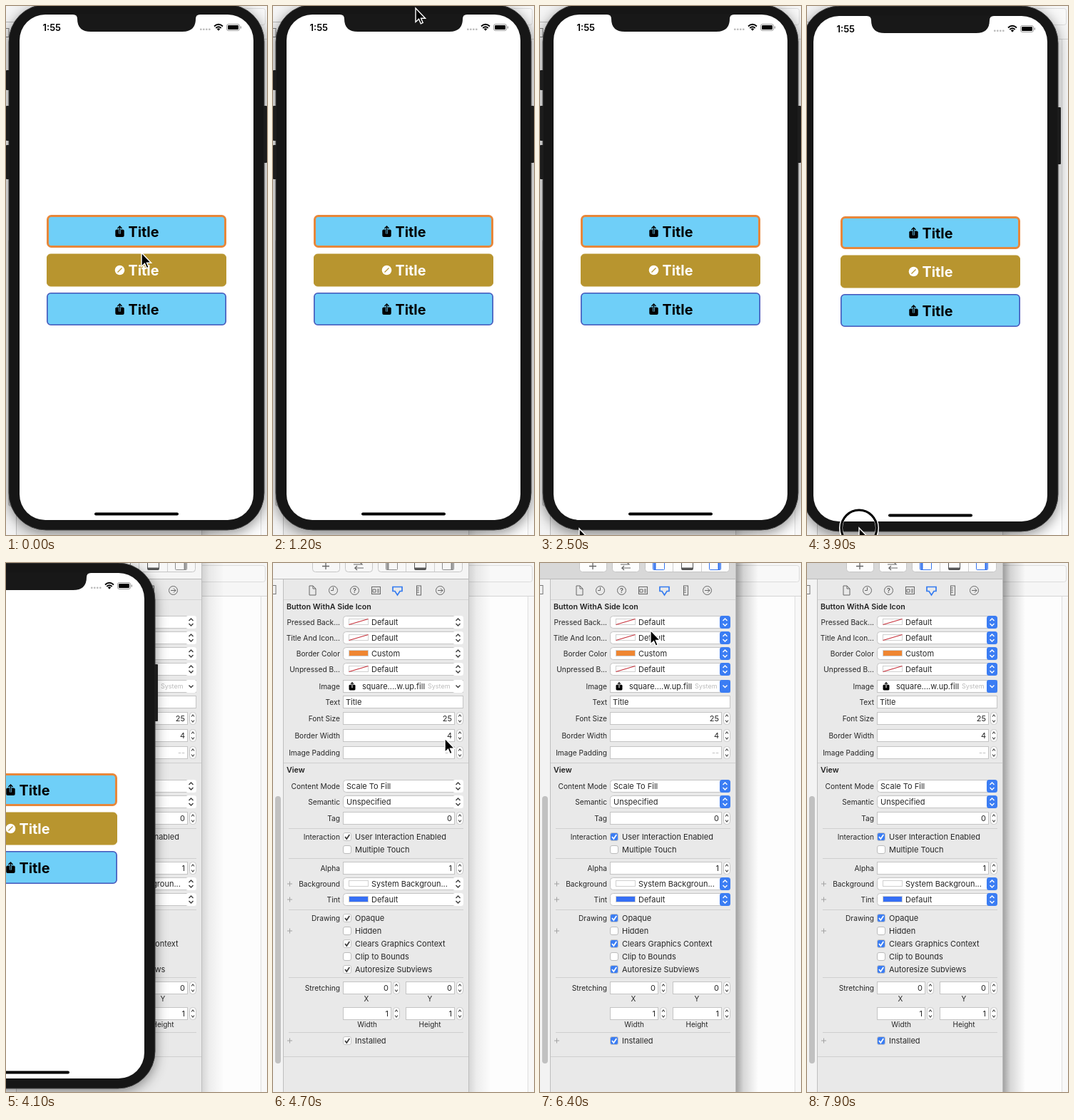
Animation of 366 by 742 pixels, one loop 8000 ms. Source, as an HTML page:

```html
<!DOCTYPE html>
<html lang="en">
<head>
<meta charset="utf-8">
<style>
html, body { margin: 0; width: 100%; height: 100%; overflow: hidden; background: #fff; }
svg { display: block; font-family: Inter, Roboto, sans-serif;
  --bar: #f5f5f5; --accent: #fff; --mark: #3c3c3c; --edge: #c4c4c4; --tool: #f7f7f7; --pane: #8c8c8c; --shade: .16; }
svg.active { --bar: #d8d8d8; --accent: #3b7df3; --mark: #fff; --tool: #fdfdfd; --pane: #3574ee; --shade: .38; }
text { white-space: pre; }
</style>
</head>
<body>
<svg id="stage" width="366" height="742" viewBox="0 0 366 742">
  <defs>
    <linearGradient id="side"><stop stop-color="#000" stop-opacity="1"/><stop offset=".35" stop-color="#000" stop-opacity=".4"/><stop offset="1" stop-color="#000" stop-opacity="0"/></linearGradient>
    <filter id="soft" x="-20%" y="-20%" width="140%" height="140%"><feDropShadow dx="0" dy="4" stdDeviation="9" flood-opacity=".45"/></filter>
  </defs>
  <g id="desk"></g>
  <g id="menu" filter="url(#soft)"></g>
  <g id="phone"></g>
  <g id="cursor">
    <g id="ring" fill="none"><circle r="25.5" stroke="#fff" stroke-width="5"/><circle r="25" stroke="#000" stroke-width="3"/></g>
    <path d="M0 0V19.5L4.5 15.3L7.3 21.8L10.2 20.5L7.5 14.2H13.6Z" stroke="#fff" stroke-width="1.4"/>
  </g>
</svg>
<script>
const $ = id => document.getElementById(id);
const rect = (x, y, w, h, fill, stroke = 'none', r = 0, sw = 1) =>
  `<rect x="${x}" y="${y}" width="${w}" height="${h}" rx="${r}" fill="${fill}" stroke="${stroke}" stroke-width="${sw}"/>`;
const path = (d, stroke, sw = 1, fill = 'none') =>
  `<path d="${d}" stroke="${stroke}" stroke-width="${sw}" fill="${fill}"/>`;
const text = (s, x, y, size = 11, anchor = 'start', fill = '#262626', weight = 400) =>
  `<text x="${x}" y="${y + size * .36}" font-size="${size}" text-anchor="${anchor}" fill="${fill}" font-weight="${weight}">${s}</text>`;

// A colour "a/b" is split along the rising diagonal.
function swatch(x, y, w, h, colour, stroke) {
  if (colour === 'none') return rect(x, y, w, h, '#fff', '#d0d0d0') + path(`M${x} ${y + h}L${x + w} ${y}`, '#c8343e', 1.2);
  const [a, b] = colour.split('/');
  return rect(x, y, w, h, a) + (b ? path(`M${x + w} ${y}V${y + h}H${x}Z`, 'none', 0, b) : '') + rect(x, y, w, h, 'none', stroke);
}
const chevrons = (x, y, colour) => path(`M${x - 3} ${y - 2}l3 -3l3 3M${x - 3} ${y + 2}l3 3l3 -3`, colour, 1.4);
const shareIcon = (x, y, s = 1, gap = '#6fcff8') => `<g transform="translate(${x} ${y}) scale(${s})">` +
  rect(-6.2, -3, 12.4, 10.5, '#000', 'none', 2) + path('M0 -3V3', gap, 3) +
  path('M0 3V-7M-3 -4.5L0 -7.5L3 -4.5', '#000', 1.4) + '</g>';

function buildDesk() {
  const label = (s, y) => text(s, 94, y, 10.2, 'end');
  const rule = (y, x = 22, end = 267) => path(`M${x} ${y + .5}H${end}`, '#cfcfcf');
  const plus = y => path(`M20 ${y}h7m-3.5 -3.5v7`, '#a2a2a2');
  const box = (x, y, w, r = 0) => rect(x + .5, y - 8.5, w - 1, 17, '#fff', 'var(--edge)', r);
  const popup = (name, y, value, colour) => label(name, y) + box(98, y, 169, 4) +
    rect(252, y - 9, 15, 18, 'var(--accent)', 'none', 3.5) + chevrons(259.5, y, 'var(--mark)') +
    (colour ? swatch(106.5, y - 4.5, 27, 8, colour, '#d0d0d0') : '') + text(value, colour ? 138 : 103, y);
  const field = (x, w, y, value, fill) => box(x, y, w) + text(value, x + w - 4, y, 11, 'end', fill) +
    rect(x + w + 2.5, y - 8.5, 9, 17, '#fff', '#c8c8c8', 4) +
    path(`M${x + w + 5} ${y - 2.5}l2 -2.5l2 2.5m-4 5l2 2.5l2 -2.5`, '#444', 1.1);
  const number = (name, y, value, fill) => label(name, y) + field(98, 157, y, value, fill);
  const check = (s, y, on) => (on
    ? rect(98.5, y - 5.5, 11, 11, 'var(--accent)', 'var(--edge)', 2.5) + path(`M101 ${y}l2.3 3l4 -6`, 'var(--mark)', 1.7)
    : rect(98.5, y - 5.5, 11, 11, '#fff', '#bcbcbc', 2.5)) + text(s, 115, y);
  const pane = (x, d, colour) => rect(x - 7.5, -5, 16, 14.5, 'none', colour, 1) + path(d, colour, 3);

  $('desk').innerHTML =
    rect(0, 0, 366, 742, '#fdfdfd') + rect(274, 0, 92, 46, '#f6f6f6') +
    rect(200, 3.5, 163.5, 23, '#f8f8f8', '#dcdcdc', 3) + path('M274 46.5H366', '#d4d4d4') +
    rect(357, 47, 9, 695, '#f8f8f8') + path('M357.5 47V742', '#dedede') +
    `<rect x="274" width="32" height="742" fill="url(#side)" style="opacity:var(--shade)"/>` +
    rect(0, 0, 274, 742, '#e9e9e9') + rect(0, 23, 14, 719, '#f3f3f3') +
    rect(0, 0, 274, 22, 'var(--bar)') + path('M0 22.5H274', '#b9b9b9') +
    path('M14.5 23V742M274.5 0V742', '#bebebe') + path('M15 51.5H274', '#d4d4d4') +
    rect(3, 327, 8, 375, '#c1c1c1', 'none', 4) + rect(-8, 31.5, 12, 12, 'none', '#777') +
    [[55, 38], [101, 38], [147, 118]].map(([x, w]) => rect(x + .5, -8, w, 20.5, 'var(--tool)', '#c6c6c6', 4)).join('') +
    path('M186.5 0V12M226.5 0V12', '#cecece') + path('M69 4.5h10M74 0v9', '#666', 1.3) +
    path('M113 2h12l-3 -3M127 7h-12l3 -3m-3 3l3 3', '#666', 1.2) +
    pane(166, 'M161 -4V9', 'var(--pane)') + pane(206, 'M199 8H214', '#555') + pane(245, 'M251 -4V9', 'var(--pane)') +
    path('M51 32h5l4 4v9h-9zM56 32v4h4', '#666') +
    '<g fill="none" stroke="#666"><circle cx="84.500" cy="38.500" r="6"/><circle cx="114.500" cy="38.500" r="6"/><circle cx="234.500" cy="38.500" r="6"/></g>' +
    path('M84.500 34v4.500h-3.500M231 38.500h7m-3 -3l3 3l-3 3', '#666') + text('?', 114.5, 38.5, 9, 'middle', '#555', 600) +
    rect(138.5, 33.5, 12, 10, 'none', '#666') + path('M140 37h4v4h-4zM146 37h3m-3 2h3m-3 2h3', '#666') +
    path('M168 33.500h13v6h-3l-3.500 5.500l-3.500 -5.500h-3z', '#347bf0', 1.7) +
    rect(201.5, 32, 6, 13, 'none', '#666') + path('M202 35h3m-3 3h3m-3 3h3', '#666') +
    text('Button WithA Side Icon', 19, 61, 10.7, 'start', '#222', 600) +
    popup('Pressed Back...', 83, 'Default', 'none') + popup('Title And Icon...', 105, 'Default', 'none') +
    popup('Border Color', 127, 'Custom', '#ef8632') + popup('Unpressed B...', 149, 'Default', 'none') +
    label('Image', 173) + box(98, 173, 169) + rect(252, 164, 15, 18, 'var(--accent)', 'none', 3) +
    path('M256.500 171.500l3 3l3 -3', 'var(--mark)', 1.4) + shareIcon(111, 173, .72, '#fff') +
    text('square....w.up.fill', 125, 173) + text('System', 217, 173, 9, 'start', '#bbb') +
    label('Text', 195) + box(98, 195, 169) + text('Title', 102, 195) +
    number('Font Size', 218, '25') + number('Border Width', 242, '4') + number('Image Padding', 266, '--', '#bbb') +
    rule(280, 15, 274) + text('View', 19, 290, 10.7, 'start', '#222', 600) +
    popup('Content Mode', 313, 'Scale To Fill') + popup('Semantic', 335, 'Unspecified') + number('Tag', 358, '0') +
    rule(372) + label('Interaction', 384) + check('User Interaction Enabled', 384, true) + check('Multiple Touch', 402) +
    rule(414) + number('Alpha', 428, '1') + popup('Background', 450, 'System Backgroun...', '#fff') +
    popup('Tint', 472, 'Default', '#366ff5') + rule(486) + label('Drawing', 498) +
    check('Opaque', 498, true) + check('Hidden', 516) + check('Clears Graphics Context', 534, true) +
    check('Clip to Bounds', 552) + check('Autoresize Subviews', 570, true) + rule(581) + label('Stretching', 596) +
    field(98, 68, 596, '0') + field(186, 69, 596, '0') + field(98, 68, 632, '1') + field(186, 69, 632, '1') +
    text('X', 131, 611, 10, 'middle') + text('Y', 220, 611, 10, 'middle') +
    text('Width', 132, 647, 10, 'middle') + text('Height', 220, 647, 10, 'middle') +
    rule(658) + check('Installed', 670, true) + rule(692, 15, 274) + [450, 472, 516, 670].map(plus).join('');
}

function buildMenu() {
  const recent = [
    '#fff #b4922f #ef8635 #000/#fff #000 #f0b53a #333/#aaa #efa95f #7a4a2c #5b2d22/#f3d2c0 #45b45a #f09a3e',
    '#e36b77 #1c1c1c #3b2270 #fff #ee9440 #484848 #f0b28a/#57331f #3f2470 #eee/#8a4a35 #999 #000/#bbb #4678c4'];
  const list = `Dark Text=#000,Group Table View Background=#f1f1f1,Label=#000,Light Text=#fff/#8c8c8c,Link=#3b73f6,
Opaque Separator=#bdbdbd,Placeholder Text=#111/#b5b5b5,Quaternary Label=#111/#d0d0d0,Quaternary System Fill=#111/#eee,
Scroll View Textured Background=#5c6670,Secondary Label=#111/#808080,Secondary System Background=#f1f1f1,
Secondary System Fill=#111/#ddd,Secondary System Grouped Background=#fff,Separator=#111/#b8b8b8,System Background=#fff,
System Blue=#3b73f6,System Brown=#98703f,System Fill=#111/#cfd3cb,System Gray=#858585,System Green=#4ab658,
System Grouped Background=#f1f1f1,System Indigo=#4b4bcb,System Orange=#ee8b1c,System Pink=#e92c4a,System Purple=#a04bd8,
System Red=#e63329,System Teal=#5cb8e6,System Yellow=#f3c112,Table Cell Grouped Background=#fff,Tertiary Label=#111/#bbb,
Tertiary System Background=#fff,Tertiary System Fill=#111/#dfe3da,Tertiary System Grouped Background=#f1f1f1,
View Flipside Background=#1c1c1f,Black=#000`.replace(/\n/g, '').split(',');
  $('menu').innerHTML = rect(49, 71, 317, 690, '#f4f4f4', '#c8c8c8', 4) +
    rect(49, 75, 317, 16, '#2a50d2') + path('M54 83l3 3.500l4.500 -7', '#fff', 1.7) +
    swatch(70.5, 79, 27, 8, 'none') + text('Default', 102, 83, 11, 'start', '#fff') +
    path('M50 97H366M50 167.500H366', '#dcdcdc', 2) + text('Recently Used Colors', 70, 112, 11, 'start', '#484848') +
    recent.map((row, j) => row.split(' ').map((c, i) => swatch(71.5 + 20 * i, 124.5 + 22 * j, 11, 11, c, '#111')).join('')).join('') +
    list.map((item, i) => {
      const [name, colour] = item.split('='), y = 182 + 16 * i;
      return swatch(70.5, y - 4, 27, 8, colour, '#00000022') + text(name + ' Color', 102, y);
    }).join('');
}

function buildPhone() {
  const button = (y, fill, stroke, sw, ink) =>
    rect(57 + sw / 2, y + sw / 2, 252 - sw, 46 - sw, fill, stroke, 5, sw) + text('Title', 171.5, y + 23.5, 19.8, 'start', ink, 700);
  $('phone').innerHTML =
    `<g filter="url(#soft)">${rect(4, -2, 358, 737, '#181818', '#3a3a3a', 52)}</g>` +
    [[0, 90, 28], [0, 140, 49], [0, 195, 48], [361, 140, 80]].map(([x, y, h]) => rect(x, y, 5, h, '#1c1c1c', 'none', 1)).join('') +
    rect(19, 12, 328, 709, '#fff', 'none', 36) +
    path('M94 11V12Q100 12 100 18Q100 36 119 36H247Q266 36 266 18Q266 12 272 12V11Z', 'none', 0, '#181818') +
    text('1:55', 51.5, 30, 13, 'start', '#000', 600) +
    [273, 277, 281, 285].map(x => rect(x - 1, 31.5, 2.6, 2.6, '#bbb', 'none', 1)).join('') +
    path('M292 28.500Q298 23 304 28.500M294.300 31Q298 27.600 301.700 31', '#000', 1.9) + path('M295.800 32.300Q298 30.400 300.200 32.300L298 34.700Z', 'none', 0, '#000') +
    rect(309.5, 25.5, 18, 9, 'none', '#999', 2.5) + rect(311, 27, 15, 6, '#000', 'none', 1.2) + rect(328.7, 28.5, 1.3, 3, '#999') +
    button(293, '#6fcff8', '#e8873a', 3, '#000') + button(347.5, '#b8952f', '#b8952f', 1, '#fff') + button(402, '#6fcff8', '#4556bb', 1.6, '#000') +
    shareIcon(159.5, 316.5) + shareIcon(159.5, 425.5) +
    '<circle cx="159.500" cy="370.500" r="6.800" fill="#fff"/>' + path('M156.500 373.500l6 -6', '#b8952f', 1.3) +
    rect(124, 710.5, 118, 4, '#000', 'none', 2);
}

// Keys are [time, x, y]; movement eases between neighbours.
function along(keys, t) {
  let i = 1;
  while (i < keys.length - 1 && t > keys[i][0]) i++;
  const [t0, x0, y0] = keys[i - 1], [t1, x1, y1] = keys[i];
  const u = Math.max(0, Math.min(1, (t - t0) / (t1 - t0))), e = u * u * (3 - 2 * u);
  return [x0 + (x1 - x0) * e, y0 + (y1 - y0) * e];
}
const pointer = [[0, 190, 346], [900, 200, 5], [1200, 200, 3], [1800, 75, 714], [2500, 55, 733], [3500, 83, 730],
  [3700, 83, 730], [3900, 73, 732], [4400, -330, 732], [4700, 241, 246], [5050, 166, 82], [5800, 166, 75], [6300, 166, 82], [7000, -30, 300]];
const drag = [[3700, 0, 0], [3900, -10, 2], [4400, -413, 2]];
const place = (id, [x, y]) => $(id).setAttribute('transform', `translate(${x.toFixed(2)} ${y.toFixed(2)})`);
const show = (id, on) => $(id).style.display = on ? '' : 'none';

function draw(now) {
  const t = now % 8000;
  place('cursor', along(pointer, t));
  place('phone', along(drag, t));
  show('phone', t < 4400);
  show('menu', t >= 5300 && t < 6200);
  show('ring', (t >= 3600 && t < 4400) || (t >= 5100 && t < 5300));
  $('stage').classList.toggle('active', t >= 5100);
  requestAnimationFrame(draw);
}
buildDesk();
buildMenu();
buildPhone();
requestAnimationFrame(draw);
</script>
</body>
</html>
```
